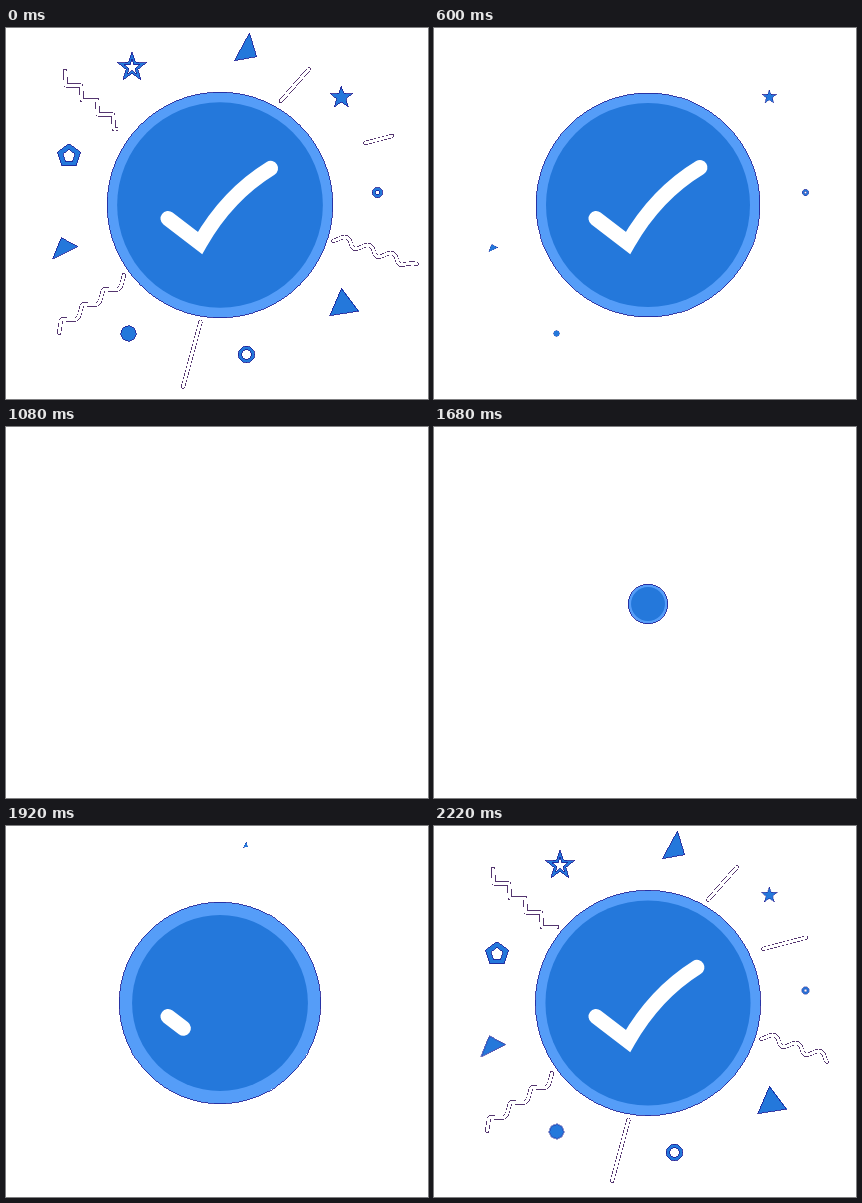
An HTML page for the animation above (2.25 s loop, 422 px wide and 371 px high).

```html
<!DOCTYPE html>
<html lang="en">
<head>
<meta charset="utf-8">
<title>Success check</title>
<style>
  html, body { margin: 0; width: 100%; height: 100%; overflow: hidden; background: #fff; }
  svg { display: block; width: 100%; height: 100%; }
  .pop { transform-box: fill-box; transform-origin: center; }
  .solid { fill: #2478db; }
  .hole { fill: #fff; }
  .edge { stroke: #1c1a92; stroke-width: .8; shape-rendering: crispEdges; }
  .streak { fill: none; stroke-linecap: round; stroke-linejoin: round; shape-rendering: crispEdges; }
  .rim { stroke: #54356f; stroke-width: 4.2; }
  .core { stroke: #fff; stroke-width: 3; }
  #check { fill: none; stroke: #fff; stroke-width: 15; stroke-linecap: round; stroke-dasharray: 100 300; }
</style>
</head>
<body>
<svg viewBox="0 0 422 371">
  <g id="streaks"></g>
  <circle id="outer" class="edge" cx="214" cy="177" fill="#559df8"/>
  <circle id="inner" class="solid" cx="214" cy="177"/>
  <path id="check" pathLength="100" d="M162 190.5L194 215Q222 166 266 139.5"/>
  <g id="shapes"></g>
</svg>
<script>
const LOOP = 2250;
const LEAD = 600;        // the loop opens this far after the badge starts to grow
const POP = 150;         // time a shape takes to scale in or out
const SHAPE_STAY = 680;  // from entering to leaving
const STREAK_STAY = 290;
const HIDDEN = 102;      // dash offset that hides a path and its round cap
const EASE_OUT = 'cubic-bezier(.333,1,.667,1)';
const byId = id => document.getElementById(id);

function add(parent, tag, attrs) {
  const el = document.createElementNS('http://www.w3.org/2000/svg', tag);
  for (const name in attrs) el.setAttribute(name, attrs[name]);
  return parent.appendChild(el);
}

// keys: [ms since the badge starts, value, easing to the next key]
function animate(el, prop, keys) {
  const all = [[0, keys[0][1]], ...keys, [LOOP, keys[keys.length - 1][1]]];
  el.animate(all.map(([time, value, easing = 'linear']) =>
    ({ offset: time / LOOP, [prop]: value, easing })),
    { duration: LOOP, delay: -LEAD, iterations: Infinity });
}

// Burst open, swell slowly to a peak, rest, then collapse.
function badge(id, burst, rest) {
  animate(byId(id), 'r', [[0, '0px'], [150, burst + 'px'], [580, rest + 1 + 'px'],
    [720, rest + 'px'], [1560, rest + 'px'], [1680, '0px']]);
}
badge('outer', 96, 112);
badge('inner', 82, 102);

// A dash slides along the path: positive offsets reveal it, negative ones wipe it.
function slide(el, enter, grow, exit, wipe, easeIn, easeOut) {
  animate(el, 'strokeDashoffset', [[enter, HIDDEN, easeIn], [enter + grow, 0],
    [exit, 0, easeOut], [exit + wipe, -HIDDEN]]);
}
slide(byId('check'), 247, 455, 1360, 270, EASE_OUT, 'ease-in-out');

function streak(d, enter, { grow = 180, wipe = 200, dash = 100 } = {}) {
  for (const layer of ['rim', 'core']) {
    const path = add(byId('streaks'), 'path', {
      d, pathLength: 100, class: 'streak ' + layer, 'stroke-dasharray': dash + ' 400'
    });
    slide(path, enter, grow, enter + STREAK_STAY, wipe);
  }
}

streak('M123 101' + 'h-15l-1-14.5'.repeat(4), 290);
streak('M274 74L303 41', 305);
streak('M321 125L386 108', 273, { grow: 147, wipe: 66, dash: 66 });
streak('M118 247' + 'c-3 12-3 15-10 15s-8-2-11 0'.repeat(3) + 'q-1 8-2 13', 325);
streak('M194.5 294L177 359', 421, { grow: 160 });
streak('M327 213' + 'c7-2 11-6 15-3s2 11 8 11'.repeat(3) + 'c7-2 11-3 17 0', 425);

function pop(enter, ...parts) {
  const group = add(byId('shapes'), 'g', { class: 'pop' });
  parts.forEach(([tag, attrs], i) =>
    add(group, tag, { ...attrs, class: 'edge ' + (i ? 'hole' : 'solid') }));
  const exit = enter + SHAPE_STAY;
  animate(group, 'transform', [[enter, 'scale(0)'], [enter + POP, 'scale(1)'],
    [exit, 'scale(1)'], [exit + POP, 'scale(0)']]);
}

const disc = (cx, cy, r) => ['circle', { cx, cy, r }];
const polygon = points => ['polygon', { points }];

function radial(cx, cy, radii, count) {
  const points = Array.from({ length: count }, (_, i) => {
    const angle = i / count * 2 * Math.PI - Math.PI / 2;
    const r = radii[i % radii.length];
    return [cx + r * Math.cos(angle), cy + r * Math.sin(angle)];
  });
  return polygon(points.join(' '));
}
const star = (cx, cy, r) => radial(cx, cy, [r, r * .4], 10);
const pentagon = (cx, cy, r) => radial(cx, cy, [r], 5);

pop(240, polygon('243.5,5 250.5,28.5 228.5,32.5'));
pop(270, disc(240.5, 326.5, 8.2), disc(240.5, 326.5, 4.8));
pop(310, star(126, 39.4, 15.3), star(126, 39.4, 8));
pop(315, polygon('335.5,259.5 353,283 323.5,287.5'));
pop(315, pentagon(63, 127.9, 12.2), pentagon(63, 127.9, 6.4));
pop(425, polygon('55,209.5 71.5,218.5 46.5,230.5'));
pop(430, disc(122.5, 305.5, 7.6));
pop(465, disc(371.5, 164.5, 5), disc(371.5, 164.5, 2));
pop(465, star(335.3, 69.3, 11.8));
</script>
</body>
</html>
```
